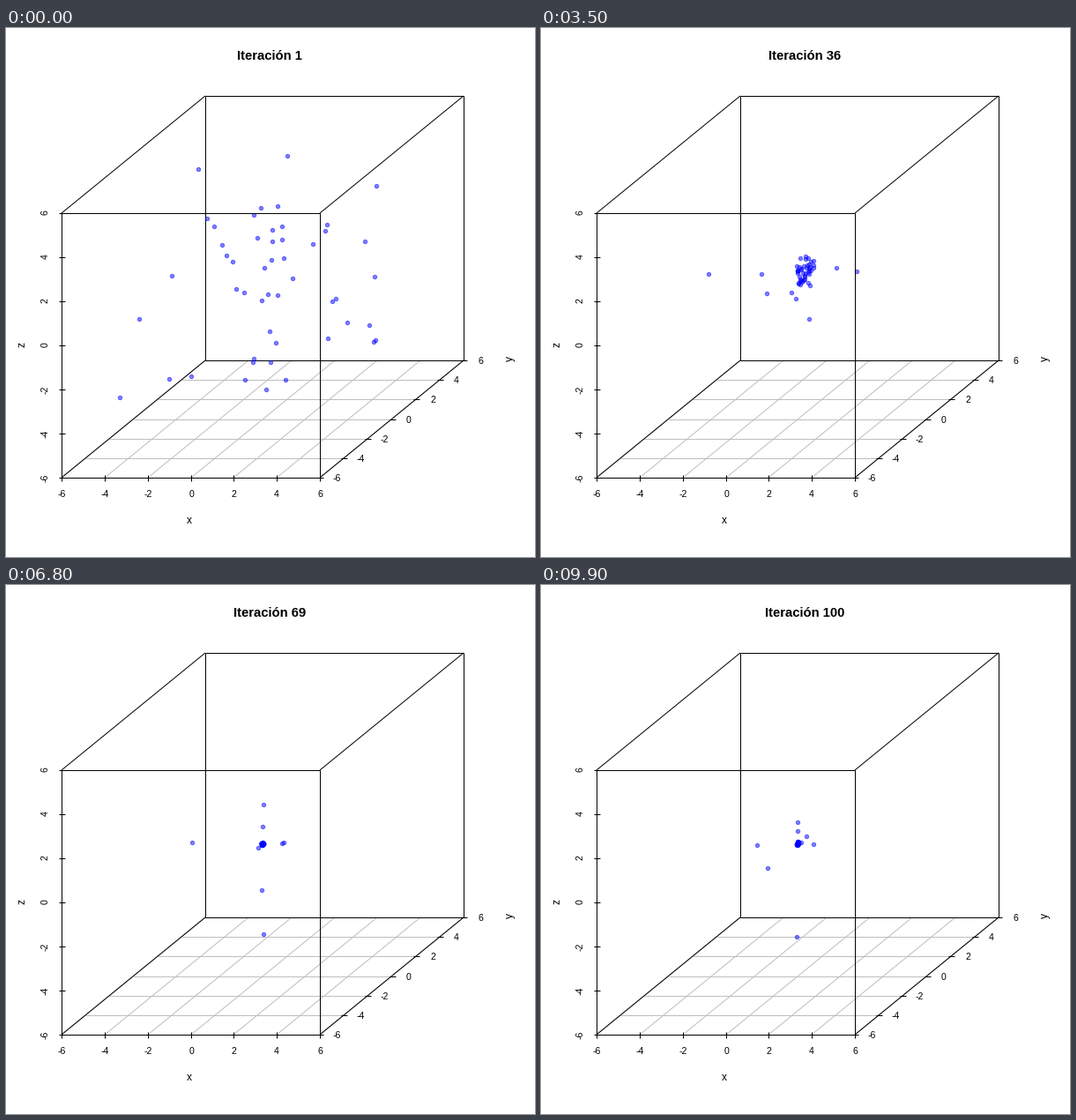
A matplotlib script that plays this animation: 600x600 px, repeating every 10000 ms.

```python
import numpy as np
import matplotlib.pyplot as plt
from matplotlib.animation import FuncAnimation

FRAMES, STEP, SIZE, POP = 100, 100, 600, 50
PX = 0.72  # points per pixel at 100 dpi
L, R, T, B = 63, 356, 209, 509  # front face of the box
DX, DY = 163, -133  # shift from the front face to the back face

# Pixel steps per unit of x, y and z, and the place of (0, 0, 0)
AXES = np.array([[R - L, 0], [DX, DY], [0, T - B]]) / 12
ORIGIN = np.array([L + R + DX, T + B + DY]) / 2

# The best solution drifts from a local minimum to the origin
GENS = [0, 13, 25, 35, 56]
BEST_Y = [0, 0.6, 0.85, 0.45, 0]
BEST_Z = [0.5, 0.25, 0.6, 0.45, 0]
SPREAD = [0.4, 0.4, 0.3, 0.3, 0.03]
SETTLE = 13  # generations until the first cloud has contracted

START = np.random.default_rng(21).uniform([-4.4, -4.4, -4], [4.4, 4.4, 5], (POP, 3))


def mutate(pop, rng):
    """Move a few members along one axis each, half of them far."""
    for i in range(9):
        reach = rng.uniform(-4.6, 4.6) if i < 5 else rng.normal(0, 0.8)
        pop[i, rng.integers(3)] += reach


def population(n):
    """Members of one generation, in stage pixels."""
    pop = START.copy()
    if n:
        rng = np.random.default_rng(700 + n)
        best = np.array([0, np.interp(n, GENS, BEST_Y), np.interp(n, GENS, BEST_Z)])
        spread = np.interp(n, GENS, SPREAD) * np.array([0.6, 1, 1])
        core = best + spread * rng.normal(size=(POP, 3))
        left = max(0, 1 - n / SETTLE)
        keep = rng.random((POP, 1)) < left ** 3
        pull = np.where(keep, 1, left * rng.random((POP, 1)))
        pop = core + (START - core) * pull
        mutate(pop, rng)
        pop = pop.clip(-4.9, 4.9)
    return np.round(ORIGIN + pop @ AXES)


plt.rcParams["font.family"] = "Liberation Sans"
fig = plt.figure(figsize=(6, 6), dpi=100, facecolor="white")
ax = fig.add_axes([0, 0, 1, 1])
ax.set(xlim=(0, SIZE), ylim=(SIZE - 1, -1))  # whole numbers snap to pixels
ax.axis("off")


def line(x0, y0, x1, y1, color="black", z=2):
    ax.plot([x0, x1], [y0, y1], color=color, lw=PX,
            solid_capstyle="butt", zorder=z)


def label(x, y, text, size=10.5, **kw):
    ax.text(x, y, text, fontsize=size * PX, ha="center",
            va="center_baseline", **kw)


# Floor grid, ticks and tick labels
for i in range(7):
    f, value = i / 6, str(2 * i - 6)
    x, z = round(L + (R - L) * f), round(B + (T - B) * f)
    sx, sy = round(DX * f), round(DY * f)
    line(x, B, x + DX, B + DY, "#bebebe", 1)
    line(L + sx, B + sy, R + sx, B + sy, "#bebebe", 1)
    line(x, B - 3, x, B + 4)
    line(L - 3, z, L + 4, z)
    line(R + sx - 3, B + sy, R + sx + 4, B + sy)
    label(x, 527, value)
    label(45, z, value, rotation=90)
    label(R + sx + 19, B + sy, value)

# Box, with the nearest edges above the dots
for dx, dy in ((0, 0), (DX, DY)):
    near = 2 if dx else 4
    line(L + dx, B + dy, L + dx, T + dy)
    line(L + dx, B + dy, R + dx, B + dy)
    line(L + dx, T + dy, R + dx, T + dy, z=near)
    line(R + dx, B + dy, R + dx, T + dy, z=near)
for x in (L, R):
    for y in (T, B):
        line(x, y, x + DX, y + DY, z=4 if (x, y) == (R, T) else 2)

label(208, 556, "x", 12)
label(18, 359, "z", 12, rotation=90)
label(572, 376, "y", 12, rotation=90)
title = ax.text(299, 35.5, "", fontsize=14.9 * PX, weight="bold",
                ha="center", va="baseline")
BLUE = (0, 0, 1, 0.5)
dots, = ax.plot([], [], "o", ms=4.4 * PX, mfc=BLUE, mec=BLUE, mew=PX, zorder=3)


def draw(n):
    title.set_text(f"Iteración {n + 1}")
    dots.set_data(*population(n).T)
    return title, dots


anim = FuncAnimation(fig, draw, frames=FRAMES, interval=STEP, repeat=True,
                     repeat_delay=0)
plt.show()
```
